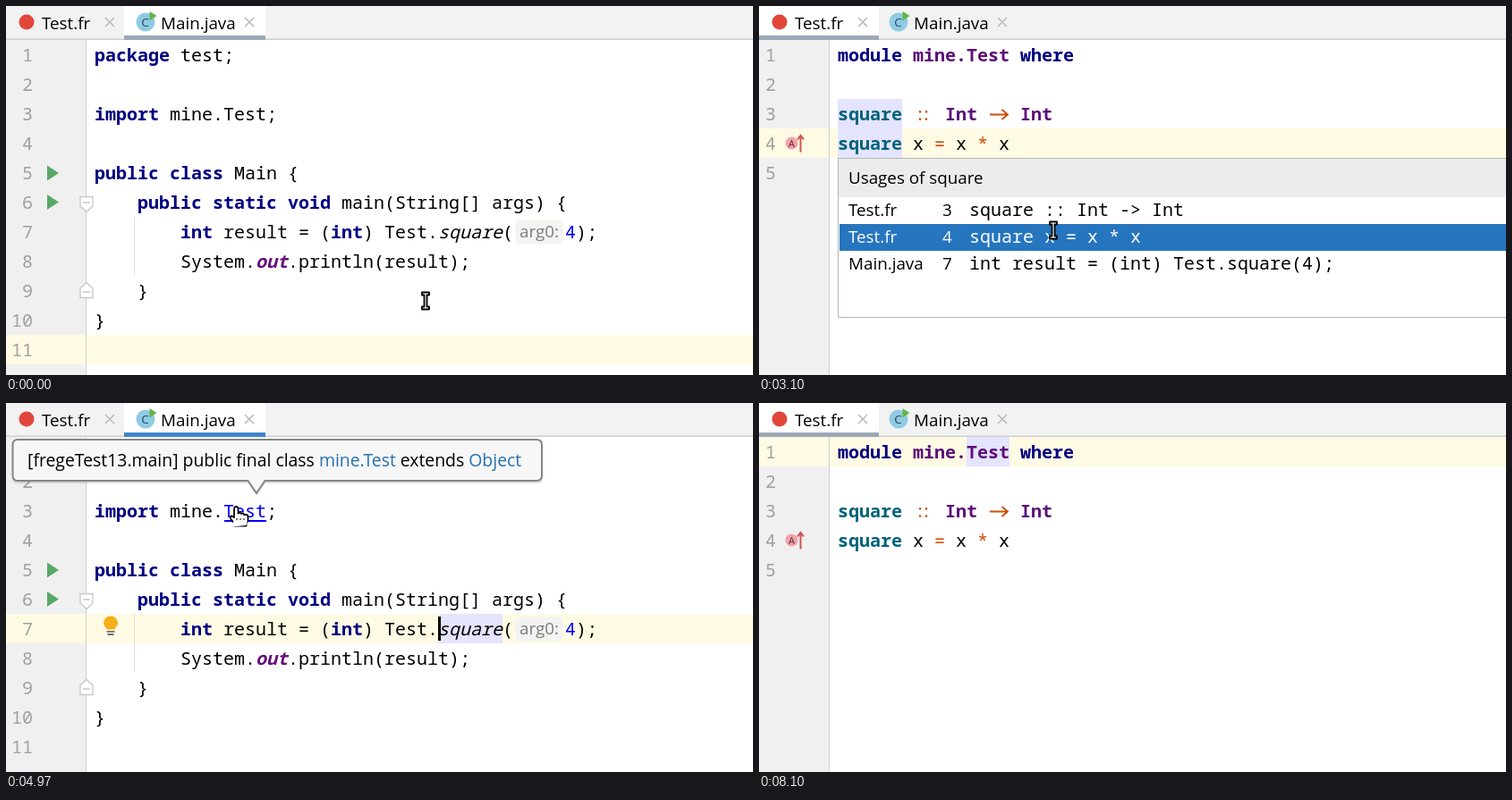
These frames come from a looping animation (835 px wide and 413 px high, 8160 ms). An HTML page:

```html
<!DOCTYPE html>
<html lang="en">
<head>
<meta charset="utf-8">
<title>Jumping between declarations and usages</title>
<style>
html, body { margin: 0; width: 100%; height: 100%; overflow: hidden; background: #fff; }
svg { display: block; width: 835px; height: 413px; }
text { white-space: pre; }
.code { font: 20px "Noto Sans Mono", "DejaVu Sans Mono", monospace; font-variant-ligatures: none; }
.ui { font: 18.8px "Open Sans", "Noto Sans", sans-serif; }
.num { fill: #a0a0a0; text-anchor: end; }
.k { fill: #000080; font-weight: 700; }
.n { fill: #0000ff; }
.f { fill: #660e7a; font-weight: 700; font-style: italic; }
.m { font-style: italic; }
.p { fill: #5c0f78; font-weight: 700; }
.q { fill: #00627a; font-weight: 600; }
.o { fill: #cc4e00; }
.row { fill: #fffae3; }
.use { fill: #e4e4ff; }
.link text { fill: #0000ff; }
.link rect { fill: #0000ff; }
.u { fill: none; }
.fold { fill: #fff; stroke: #c6c6c6; stroke-width: 1.3; }
.run { fill: #59a869; }
.close { stroke: #b9b9b9; stroke-width: 1.5; }
.tip { font-size: 19.4px; }
.tip tspan { fill: #2470b3; }
.cursor { fill: #fff; stroke: #000; stroke-width: 1.8; stroke-linejoin: round; }
.sel text { fill: #fff; }
</style>
</head>
<body>
<svg viewBox="0 0 835 413">
  <defs>
    <path id="fold" class="fold" d="M-7-7.500H7V3L0 9.500-7 3ZM-4-1H4"/>
    <path id="run" class="run" d="M-6.500-8.500 6.500 0-6.500 8.500Z"/>
    <path id="close" class="close" d="M-5-5 5 5M5-5-5 5"/>
  </defs>

  <g id="main">
    <rect y="38" width="90" height="375" fill="#f0f0f0"/>
    <rect id="mainRow" class="row" width="835" height="33"/>
    <rect x="89" y="38" width="1" height="375" fill="#d0d0d0"/>
    <rect x="143" y="236" width="1" height="65" fill="#dedede"/>
    <rect id="mainUse" class="use" x="484" y="236" width="71" height="33"/>
    <g id="mainNums" class="code num"></g>
    <use href="#run" x="52.500" y="187"/>
    <use href="#run" x="52.500" y="219.500"/>
    <use href="#fold" x="90" y="221"/>
    <use href="#fold" transform="translate(90 319) scale(1 -1)"/>
    <g class="code">
      <text x="99" y="62"><tspan class="k">package</tspan> test;</text>
      <text x="99" y="128"><tspan class="k">import</tspan> mine.</text>
      <g id="classLink"><text x="243" y="128">Test</text><rect class="u" x="244" y="131" width="47" height="2"/></g>
      <text x="291" y="128">;</text>
      <text x="99" y="194"><tspan class="k">public class</tspan> Main {</text>
      <text x="147" y="227"><tspan class="k">public static void</tspan> main(String[] args) {</text>
      <text x="195" y="260"><tspan class="k">int</tspan> result = (<tspan class="k">int</tspan>) Test.</text>
      <g id="callLink"><text class="m" x="483" y="260">square</text><rect class="u" x="484" y="263" width="71" height="2"/></g>
      <text x="555" y="260">(</text>
      <text x="625" y="260"><tspan class="n">4</tspan>);</text>
      <text x="195" y="293">System.<tspan class="f">out</tspan>.println(result);</text>
      <text x="147" y="326">}</text>
      <text x="99" y="359">}</text>
    </g>
    <rect x="569.500" y="239.500" width="53" height="27" rx="5" fill="#f3f3f2"/>
    <text class="ui" x="574" y="259" font-size="18" fill="#7c7c7c">arg0:</text>
    <g id="bulb">
      <path d="M112.500 253.500C112.500 251 109 250 109 246.500A8 8 0 0 1 125 246.500C125 250 121.500 251 121.500 253.500Z" fill="#f4af1b"/>
      <path d="M112.500 255.800H121.500M113.500 259H120.500" stroke="#6e6e6e" stroke-width="1.800"/>
    </g>
  </g>

  <g id="test">
    <rect y="38" width="79" height="375" fill="#f0f0f0"/>
    <rect id="testRow" class="row" width="835" height="33"/>
    <rect x="78" y="38" width="1" height="375" fill="#d0d0d0"/>
    <rect id="fnUse" class="use" x="88" y="104" width="72" height="66"/>
    <rect id="modUse" class="use" x="232" y="38" width="48" height="33"/>
    <g id="testNums" class="code num"></g>
    <circle cx="36.500" cy="153.500" r="7" fill="#f2a3aa"/>
    <text class="ui" x="36.500" y="157.500" text-anchor="middle" style="font-size:11px" fill="#5a2c30">A</text>
    <path d="M46.500 163.500V145M43 149.500 46.500 145 50 149.500" fill="none" stroke="#d25252" stroke-width="2"/>
    <g class="code">
      <text x="88" y="62"><tspan class="k">module</tspan> <tspan class="p">mine.Test</tspan> <tspan class="k">where</tspan></text>
      <text x="88" y="128" class="q">square</text>
      <text x="174" y="128" class="o">:</text>
      <text x="181" y="128" class="o">:</text>
      <text x="208" y="128" class="p">Int</text>
      <path d="M258 121.500H277.500M271.500 116 278 121.500 271.500 127" fill="none" stroke="#cc4e00" stroke-width="1.800"/>
      <text x="292" y="128" class="p">Int</text>
      <text x="88" y="161"><tspan class="q">square</tspan> x <tspan class="o">=</tspan> x <tspan class="o">*</tspan> x</text>
    </g>
  </g>

  <rect id="caret" width="3" height="27"/>

  <rect width="835" height="37" fill="#f2f2f2"/>
  <rect y="36.500" width="835" height="1.500" fill="#d0d0d0"/>
  <rect id="tab" height="34" fill="#fff"/>
  <rect id="tabLine" y="33" height="5"/>
  <circle cx="23" cy="18" r="8.500" fill="#e0473a"/>
  <circle cx="156" cy="18" r="10.500" fill="#8fcbe4"/>
  <text class="ui" x="155.500" y="23" text-anchor="middle" style="font-size:13.500px" fill="#2d4854">C</text>
  <path d="M160.500 6 168.500 11 160.500 16.500Z" fill="#62b543"/>
  <g class="ui">
    <text x="40" y="25.500">Test.fr</text>
    <text x="173" y="25.500">Main.java</text>
  </g>
  <use href="#close" x="116" y="18"/>
  <use href="#close" x="272" y="18"/>

  <g id="tooltip">
    <path d="M13 42H594Q600 42 600 48V84Q600 90 594 90H290L280 103 270 90H13Q7 90 7 84V48Q7 42 13 42Z" fill="#000" opacity=".12"/>
    <path d="M13 41H593Q599 41 599 47V81Q599 87 593 87H289.500L280 101 270.500 87H13Q7.500 87 7.500 81V47Q7.500 41 13 41Z" fill="#f7f7f7" stroke="#858585" stroke-width="2"/>
    <text class="ui tip" x="24" y="71">[fregeTest13.main] public final class <tspan>mine.Test</tspan> extends <tspan>Object</tspan></text>
  </g>

  <g id="popup">
    <rect x="88.500" y="170.500" width="780" height="178" fill="#fff" stroke="#b5b5b5"/>
    <rect x="89" y="171" width="780" height="43" fill="#ececec"/>
    <text class="ui" x="100" y="199">Usages of square</text>
    <rect id="pick" x="90" width="745" height="30" fill="#2675bf"/>
    <g id="usages"></g>
  </g>

  <path id="beam" class="cursor" d="M-4-9.500H4V-6.500H1.500V6.500H4V9.500H-4V6.500H-1.500V-6.500H-4Z"/>
  <g id="hand" class="cursor">
    <path d="M-5 2V-7Q-5-10-2.700-10T-.5-7V-2.500Q1-4.500 3-2Q5-3.500 6.500-.8Q10.500-2 10.500 2V5.500L8.500 10V11.500H-4.500V9L-9 3.500Q-10 .5-7.500 .5Z"/>
    <path d="M-5.500 5.500H9.500V9.500Q9.500 12-7 12Z" stroke="none"/>
    <path d="M-3 4H8" stroke-width="1" stroke-dasharray="2 2"/>
  </g>
</svg>

<script>
const LOOP = 8160;
const el = id => document.getElementById(id);
const show = (id, on) => { el(id).style.display = on ? '' : 'none'; };
const set = (id, attrs) => {
  for (const key in attrs) el(id).setAttribute(key, attrs[key]);
};
const rowTop = line => 38 + 33 * (line - 1);
const within = (t, ...spans) => spans.some(([a, b]) => t >= a && t < b);
// Latest value in a list of [time, value] pairs.
const held = (t, list) => list.filter(([at]) => at <= t).pop()[1];

const numbers = (count, right) => Array.from({ length: count }, (_, i) =>
  `<text x="${right}" y="${rowTop(i + 1) + 24}">${i + 1}</text>`).join('');
el('mainNums').innerHTML = numbers(11, 30);
el('testNums').innerHTML = numbers(5, 19);

const usages = [
  ['Test.fr', 3, 'square :: Int -&gt; Int'],
  ['Test.fr', 4, 'square x = x * x'],
  ['Main.java', 7, 'int result = (int) Test.square(4);']
];
el('usages').innerHTML = usages.map(([file, line, code], i) => {
  const y = 235 + 30 * i;
  return `<g><text class="ui" x="100" y="${y}">${file}</text>` +
    `<text class="ui" x="205" y="${y}">${line}</text>` +
    `<text class="code" x="235" y="${y}">${code}</text></g>`;
}).join('');

// Pointer centre: [time, x, y]; equal neighbours are rests.
const path = [
  [0, 469, 330], [330, 469, 330], [400, 470, 335], [680, 549, 261], [830, 533, 269],
  [1070, 533, 269], [1070, 516, 260.5], [1370, 516, 260.5], [1370, 518, 257],
  [1900, 518, 257], [2130, 329, 251], [3630, 329, 251], [3630, 488, 255],
  [4000, 488, 255], [4450, 268, 132], [4570, 260, 126], [5030, 260, 126],
  [5030, 258, 124], [5600, 258, 124], [5970, 451, 176], [6100, 472, 204],
  [6430, 472, 204], [6470, 470, 209], [6650, 220, 16], [LOOP, 220, 16]
];

function pointer(t) {
  const i = path.findIndex(p => p[0] > t);
  const [t0, x0, y0] = path[i - 1], [t1, x1, y1] = path[i];
  const k = (t - t0) / (t1 - t0);
  return [x0 + (x1 - x0) * k, y0 + (y1 - y0) * k];
}

function render(t) {
  const inTest = within(t, [1370, 3630], [5030, LOOP]);
  const focused = within(t, [1330, 2500], [3630, 8100]);
  show('main', !inTest);
  show('test', inTest);
  set('tab', inTest ? { x: 0, width: 134 } : { x: 132, width: 158 });
  set('tabLine', inTest ? { x: 0, width: 134 } : { x: 132, width: 158 });
  set('tabLine', { fill: focused ? '#3f86c8' : '#9ba8b7' });

  set('mainRow', { y: rowTop(held(t, [[0, 11], [1300, 7], [5000, 3]])) });
  set('testRow', { y: rowTop(t < 5030 ? 4 : 1) });
  show('mainUse', within(t, [3630, 5000]));
  show('bulb', within(t, [4300, 5000]));
  show('fnUse', within(t, [1430, 5030]));
  show('modUse', t >= 5030);
  el('callLink').classList.toggle('link', within(t, [1300, 1330]));
  el('classLink').classList.toggle('link', within(t, [4500, 5030]));
  show('tooltip', within(t, [4970, 5000]));

  const [cx, cy] = held(t, [[0, [483, 7]], [1370, [88, 4]], [3630, [483, 7]], [5030, [232, 1]]]);
  set('caret', { x: cx, y: rowTop(cy) + 3 });
  show('caret', within(t, [1330, 1930], [2430, 2500], [3630, 4100], [4570, 5000],
    [5600, 6100], [6600, 7100], [7770, 8070]));

  show('popup', within(t, [2570, 3600]));
  const pick = held(t, [[0, 0], [3100, 1], [3400, 2]]);
  set('pick', { y: 214 + 30 * pick });
  [...el('usages').children].forEach((g, i) => g.classList.toggle('sel', i === pick));

  const isHand = within(t, [1070, 1370], [4500, 5030]);
  const move = { transform: `translate(${pointer(t).join(' ')})` };
  set('beam', move);
  set('hand', move);
  show('hand', isHand);
  show('beam', !isHand && t < 6670);
}

const start = performance.now();
function tick() {
  render((performance.now() - start) % LOOP);
  requestAnimationFrame(tick);
}
tick();
</script>
</body>
</html>
```
